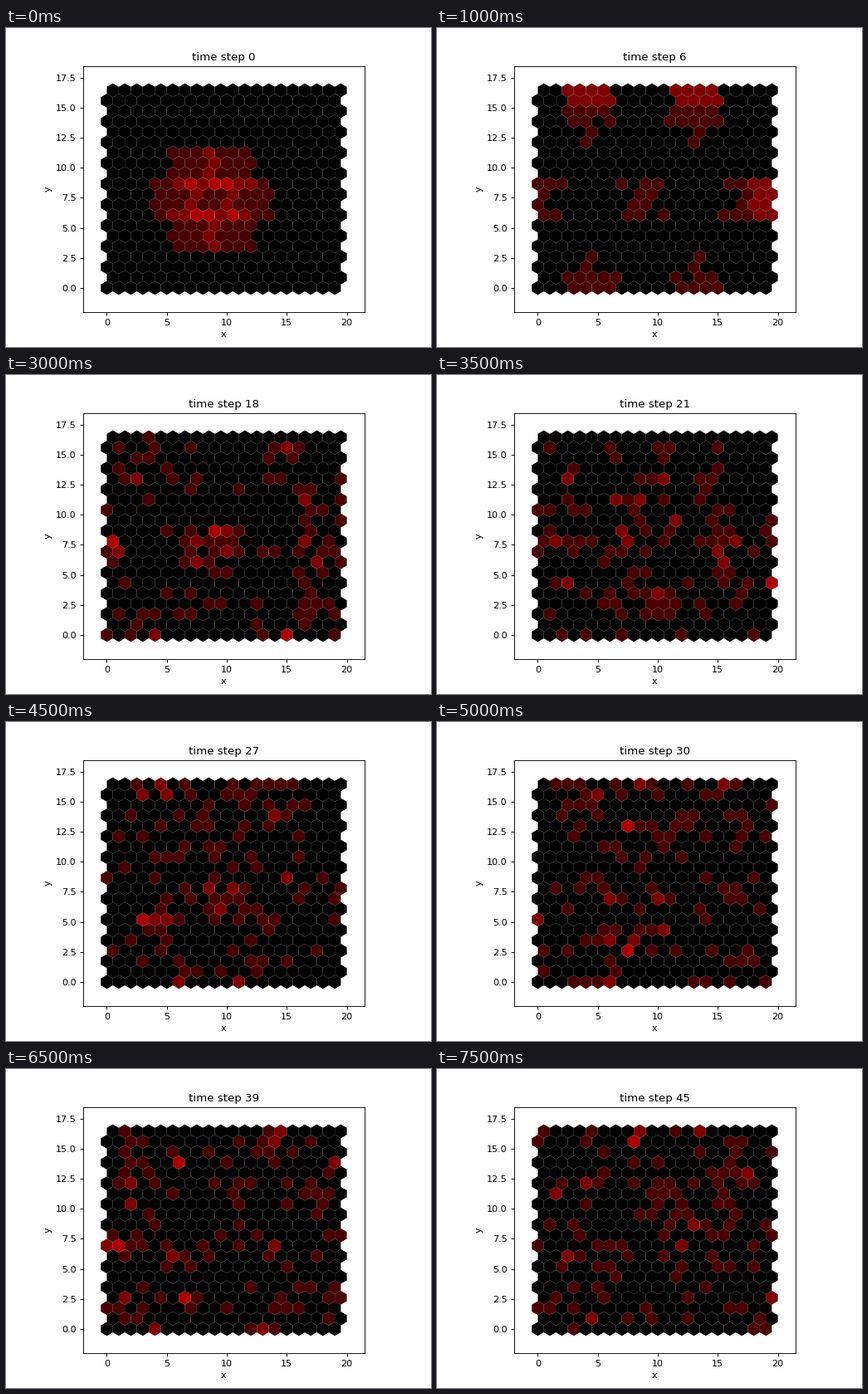
Write a matplotlib script that moves like this. It is 512x384 px and loops after 8 s.

```python
import itertools
import random

import numpy as np
import matplotlib.pyplot as plt
from matplotlib.animation import FuncAnimation
from matplotlib.collections import PolyCollection

# Hexagonal lattice gas with rest particles on a periodic grid
N = 20
FRAMES, STRIDE, WARMUP = 16, 3, 3
# Six moves counter-clockwise, then rest: (dx, dy) in half columns and rows
DIRS = [(2, 0), (1, 1), (-1, 1), (-2, 0), (-1, -1), (1, -1), (0, 0)]
LEVELS = np.array([0, 72, 125, 172, 200, 225, 242, 255]) / 255

rng = random.Random(12)


def invariants(state):
    moving = [d for d, on in zip(DIRS, state) if on]
    return len(moving), sum(d[0] for d in moving), sum(d[1] for d in moving)


def collision_table():
    """Map each cell state to the others of equal mass and momentum."""
    states = list(itertools.product((0, 1), repeat=len(DIRS)))
    groups = {}
    for s in states:
        groups.setdefault(invariants(s), []).append(s)
    return {s: [o for o in groups[invariants(s)] if o != s] or [s]
            for s in states}


OUTCOMES = collision_table()


def collide(gas):
    cells = gas.reshape(len(DIRS), -1).T.tolist()
    after = [rng.choice(OUTCOMES[tuple(c)]) for c in cells]
    return np.array(after).T.reshape(gas.shape)


def stream(gas):
    out = gas.copy()
    for d, (dx, dy) in enumerate(DIRS):
        p = gas[d].copy()
        if dy == 0:
            out[d] = np.roll(p, dx // 2, axis=1)
            continue
        # Odd rows sit half a cell to the right
        rows = slice(1, None, 2) if dx > 0 else slice(0, None, 2)
        p[rows] = np.roll(p[rows], dx, axis=1)
        out[d] = np.roll(p, dy, axis=0)
    return out


def advance(gas, steps):
    for _ in range(steps):
        gas = stream(collide(gas))
    return gas


def run():
    gas = np.zeros((len(DIRS), N, N), dtype=int)
    gas[:, 7:11, 7:11] = 1
    gas = advance(gas, WARMUP)
    history = []
    for _ in range(FRAMES):
        history.append(gas.sum(axis=0).ravel())
        gas = advance(gas, STRIDE)
    return history


history = run()

row, col = np.mgrid[0:N, 0:N]
centers = np.column_stack([(col + 0.5 * (row % 2)).ravel(),
                           (row * np.sqrt(3) / 2).ravel()])
angle = np.pi / 2 + np.arange(6) * np.pi / 3
hexagon = np.column_stack([np.cos(angle), np.sin(angle)]) / np.sqrt(3)

fig, ax = plt.subplots(figsize=(6.4, 4.8), dpi=80)
cells = PolyCollection(centers[:, None] + hexagon, edgecolors="none",
                       linewidths=0)
ax.add_collection(cells)
ax.set_aspect("equal")
ax.set_xlim(-2, N - 0.5 + 2)
ax.set_ylim(-2, (N - 1) * np.sqrt(3) / 2 + 2)
ax.set_xlabel("x")
ax.set_ylabel("y")
title = ax.set_title("time step 0")


def update(i):
    colors = np.zeros((N * N, 3))
    colors[:, 0] = LEVELS[history[i]]
    cells.set_facecolor(colors)
    title.set_text(f"time step {i * STRIDE}")
    return cells, title


anim = FuncAnimation(fig, update, frames=FRAMES, interval=500,
                     repeat=True, repeat_delay=0)
plt.show()
```
